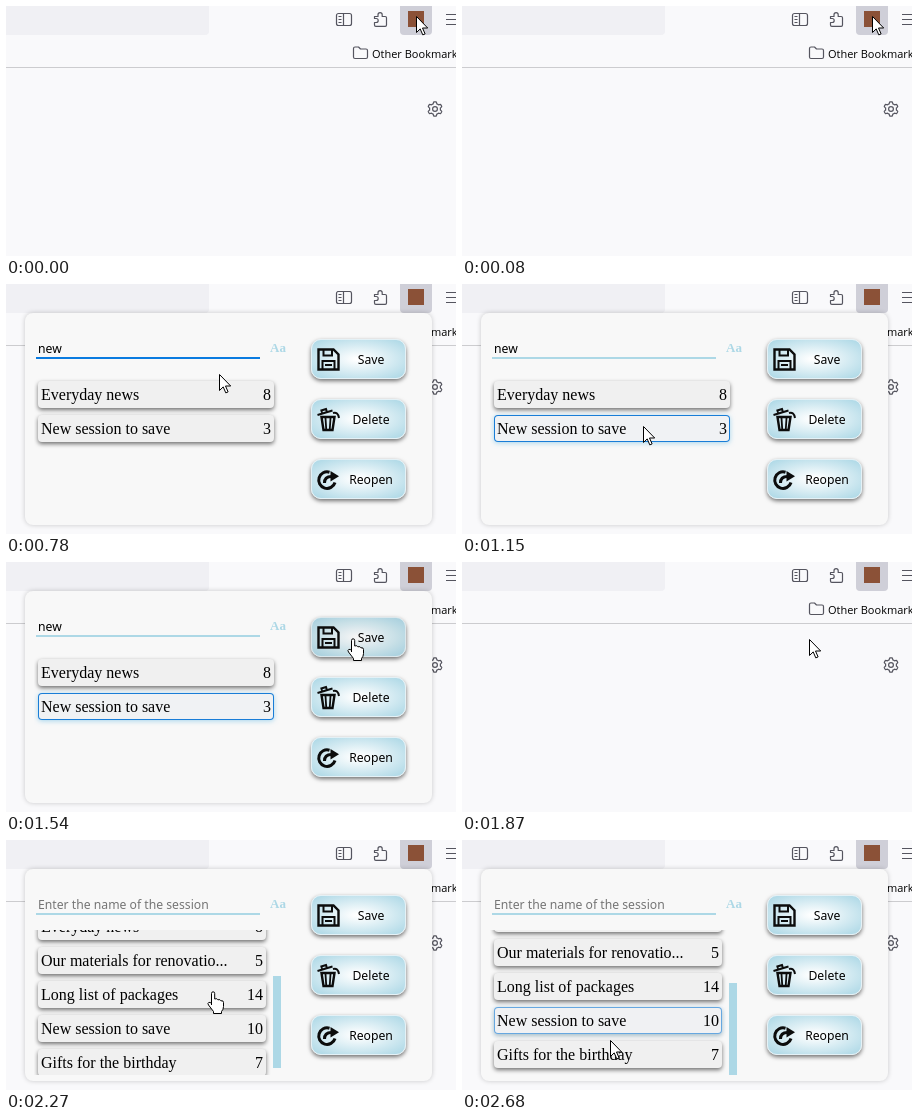
Animation, 450 px wide and 250 px high, one loop 2.73 s. Source, as an HTML page:

```html
<!DOCTYPE html>
<html lang="en">
<head>
<meta charset="utf-8">
<title>Session manager popup</title>
<style>
html, body { margin: 0; width: 100%; height: 100%; overflow: hidden; background: #f9f9fb; }
#stage { position: relative; width: 450px; height: 250px; overflow: hidden; }
#stage div, #stage svg, #stage span { position: absolute; box-sizing: border-box; white-space: pre; }
svg { overflow: visible; }
#chrome { left: 0; top: 0; fill: none; stroke: #55555f; stroke-width: 1.2; stroke-linejoin: round; }
#bookmarks { left: 366px; top: 39px; font: 11px/17px "Open Sans", sans-serif; color: #000; }
#popup { left: 19px; top: 29px; width: 407px; height: 212px; border-radius: 8px; background: #f8f8f8; box-shadow: 0 0 5px rgba(0,0,0,.2); }
#field { left: 11px; top: 26px; width: 224px; height: 20px; border-bottom: 2px solid; padding-left: 2px; font: 12.2px/19px "Noto Sans", sans-serif; }
#case { left: 245px; top: 27px; font: bold 13px/16px "Liberation Serif", serif; color: #add8e6; }
#list { left: 9px; top: 61px; width: 247px; height: 145px; overflow: hidden; }
#bar { left: 239px; width: 8px; background: #add8e6; }
.row { left: 4px; height: 27px; border-radius: 4px; font: 16px/28px "Liberation Serif", serif; color: #000; }
.row span:first-child { left: 3px; }
.row span:last-child { right: 3px; }
.button { left: 286px; width: 95px; height: 40px; border-radius: 10px; border: 1px solid #e4f1f6; background: radial-gradient(#fff 5%, #add8e6 96%); box-shadow: 0 2px 4px rgba(0,0,0,.55); font: 12.2px/40px "Noto Sans", sans-serif; color: #000; }
.button span { left: 29px; width: 60px; text-align: center; }
.button svg { left: 5px; top: 8px; fill: none; stroke: #0c0c0c; stroke-width: 2.4; }
#cursors { left: 0; top: 0; }
</style>
</head>
<body>
<div id="stage">
  <svg id="chrome" width="450" height="250">
    <path d="M0 0H203V25q0 4-4 4H0z" fill="#f0f0f4" stroke="none"/>
    <rect x="394" y="-4" width="32" height="33" rx="4" fill="#cfcfd8" stroke="none"/>
    <rect x="402" y="5" width="16" height="16" fill="#8b5137" stroke="none"/>
    <path d="M0 61.5H450" stroke="#cccccf" stroke-width="1"/>
    <rect x="330.5" y="7.5" width="15" height="12" rx="2"/>
    <path d="M337.5 7.500v12M332.500 10.500h3M332.500 13.500h3M332.500 16.500h3M440 8.500h12M440 13.500h12M440 18.500h12"/>
    <path d="M368.5 10.5h3.500v-1.700a2 2 0 0 1 4.200 0v1.700h3q1.300 0 1.300 1.300v7.200q0 1.300-1.300 1.300h-9.400q-1.300 0-1.300-1.300v-2.500h1.700a2 2 0 0 0 0-4h-1.700z"/>
    <path d="M347.500 51V42.500q0-1.500 1.500-1.500h3.500l2 2h5.500q1.500 0 1.500 1.500V51q0 1.500-1.500 1.500h-11q-1.500 0-1.500-1.500z"/>
    <circle cx="429" cy="103" r="2.400"/>
    <path id="gear"/>
  </svg>
  <div id="bookmarks">Other Bookmarks</div>
  <div id="popup">
    <div id="field"></div>
    <div id="case">Aa</div>
    <div id="list"><div id="bar"></div></div>
  </div>
  <svg id="cursors" width="450" height="250" stroke="#000" fill="#fff">
    <path id="arrow" d="M.5.5v16l3.700-3.600 2.600 6 2.300-1-2.600-5.900h5.200z"/>
    <path id="beam" d="M-3.500-7.500h2.500l1 1 1-1h2.500M0-6.500v13M-3.500 7.500h2.500l1-1 1 1h2.500" fill="none" stroke-width="1.300"/>
    <path id="hand" d="M-1.500 13V1.500q0-1.700 1.600-1.700t1.600 1.700V7q2.600-1 3.200.8 2.500-.8 3 1 2.600-.6 2.600 1.700v4q0 3-2 5v2H.5v-2l-5-6.500q-1.200-1.800.2-2.500t2.800 1z"/>
  </svg>
</div>
<script>
const LOOP = 2730;
const OPEN = 90, CLOSE = 1730, REOPEN = 1960;
const PICK = 1060, SAVED = 1600, PICK_AGAIN = 2630;
const $ = id => document.getElementById(id);

// Key points: time, then values
const path = [[0, 410, 10], [90, 410, 10], [330, 239, 58], [400, 239, 58], [520, 236, 65],
  [610, 236, 65], [780, 213, 90], [1040, 181, 142], [1170, 181, 142], [1480, 347, 77],
  [1880, 347, 77], [2130, 207, 152], [2270, 207, 152], [2430, 150, 180], [2590, 150, 180], [2680, 148, 200]];
const scrolling = [[2090, 0], [2230, 58], [2270, 58], [2320, 66]];
const typing = [[400, "n"], [450, "ne"], [500, "new"]];

const sessions = [["Shopping list", 6], ["Everyday news", 8], ["Our materials for renovatio...", 5],
  ["Long list of packages", 14], ["New session to save", 3], ["Gifts for the birthday", 7]];
const NEW = 4;

const icons = {
  Save: '<path d="M1.500 1.500h15l5 5v15h-20z"/><path d="M6.500 2v5.500h8.500V2M5.500 21v-8h12v8M8 17h7" stroke-width="2"/>',
  Delete: '<path d="M4.500 9l2 13h9l2-13z"/><path d="M8.500 10l.7 11M13.500 10l-.7 11" stroke-width="1.800"/><path d="M.5 7l15-4.500M5 4.500l-.6-2 4.600-1.400.7 2M16 5q5-1.500 6 5" stroke-width="2"/>',
  Reopen: '<path d="M18 14.500a8.300 8.300 0 1 1-5.500-10.300M7.500 15q0-6.500 7-6.500" stroke-width="3"/><path d="M13.500 3l8.500 5.300-8.500 5.200z" fill="#0c0c0c" stroke="none"/>'
};

function add(parent, cls, html) {
  const el = document.createElement("div");
  el.className = cls;
  el.innerHTML = html;
  return parent.appendChild(el);
}

function at(keys, t) {
  let i = keys.findIndex(k => k[0] > t);
  if (i < 0) i = keys.length;
  const a = keys[Math.max(0, i - 1)], b = keys[Math.min(i, keys.length - 1)];
  const u = a === b ? 0 : (t - a[0]) / (b[0] - a[0]);
  const e = u * u * (3 - 2 * u);
  return a.slice(1).map((v, n) => v + (b[n + 1] - v) * e);
}

const inside = (x, y, l, t, w, h) => x >= l && x < l + w && y >= t && y < t + h;

const buttons = Object.keys(icons).map((name, i) => {
  const el = add($("popup"), "button", `<svg width="23" height="23">${icons[name]}</svg><span>${name}</span>`);
  el.style.top = 26 + 60 * i + "px";
  return el;
});
const rows = sessions.map(([name, count]) => add($("list"), "row", `<span>${name}</span><span>${count}</span>`));

// Gear outline with six soft teeth
let d = "";
for (let i = 0; i < 72; i++) {
  const a = i * Math.PI / 36;
  const r = 6.3 + Math.max(-.9, Math.min(.9, 1.7 * Math.cos(6 * a)));
  d += `${i ? "L" : "M"}${429 + r * Math.sin(a)} ${103 - r * Math.cos(a)}`;
}
$("gear").setAttribute("d", d + "z");

function drawField(query, focused) {
  const s = $("field").style;
  $("field").textContent = query || "Enter the name of the session";
  s.color = query ? "#000" : "#757575";
  s.borderColor = focused ? "#0a7be0" : "#add8e6";
}

// Returns true when the pointer is over a row that is not picked
function drawList(t, query, x, y) {
  const shown = sessions.map(s => s[0].toLowerCase().includes(query));
  const total = shown.filter(Boolean).length;
  const long = total > 4;
  const scroll = at(scrolling, t)[0];
  const start = t < CLOSE ? PICK : PICK_AGAIN;
  const glow = Math.max(0, Math.min(1, (t - start) / 80));
  let slot = 0, hover = false;
  rows.forEach((row, i) => {
    const s = row.style;
    s.display = shown[i] ? "block" : "none";
    if (!shown[i]) return;
    const top = 7 + 34 * slot++ - scroll;
    const width = long ? 228 : 236;
    const g = i === NEW ? glow : 0;
    s.top = top + "px";
    s.width = width + "px";
    s.background = `rgb(240,${240 + 2 * g},${240 + 4 * g})`;
    s.boxShadow = `inset 0 0 0 1px rgba(25,125,215,${g}), 0 1px 5px rgba(110,190,230,${g * .6}), 0 2px 4px rgba(0,0,0,${.55 * (1 - g)})`;
    if (!g && inside(x, y, 32, 90 + top, width, 27)) hover = true;
  });
  rows[NEW].lastChild.textContent = t < SAVED ? 3 : 10;
  const thumb = 92 * 6 / total;
  const bar = $("bar").style;
  bar.display = long ? "block" : "none";
  bar.height = thumb + "px";
  bar.top = Math.floor(scroll / 66 * (145 - thumb)) + "px";
  return hover;
}

function draw(now) {
  const t = now % LOOP;
  const [x, y] = at(path, t);
  const open = t >= OPEN && t < CLOSE || t >= REOPEN;
  const query = t < CLOSE ? typing.reduce((q, [when, text]) => t >= when ? text : q, "") : "";
  $("popup").style.display = open ? "block" : "none";
  drawField(query, t >= 330 && t < PICK);
  const overRow = drawList(t, query, x, y);
  const overSave = inside(x, y, 305, 55, 95, 40);
  const pressed = overSave && t >= 1540 && t < SAVED;
  buttons[0].style.filter = pressed ? "brightness(.96)" : "";

  const overField = inside(x, y, 30, 55, 224, 20);
  const kind = !open ? "arrow" : overField ? "beam" : overRow || overSave ? "hand" : "arrow";
  for (const id of ["arrow", "beam", "hand"]) {
    $(id).style.display = id === kind ? "inline" : "none";
    $(id).setAttribute("transform", `translate(${Math.round(x)} ${Math.round(y)})`);
  }
}

const begin = performance.now();
function tick() {
  draw(performance.now() - begin);
  requestAnimationFrame(tick);
}
tick();
</script>
</body>
</html>
```
